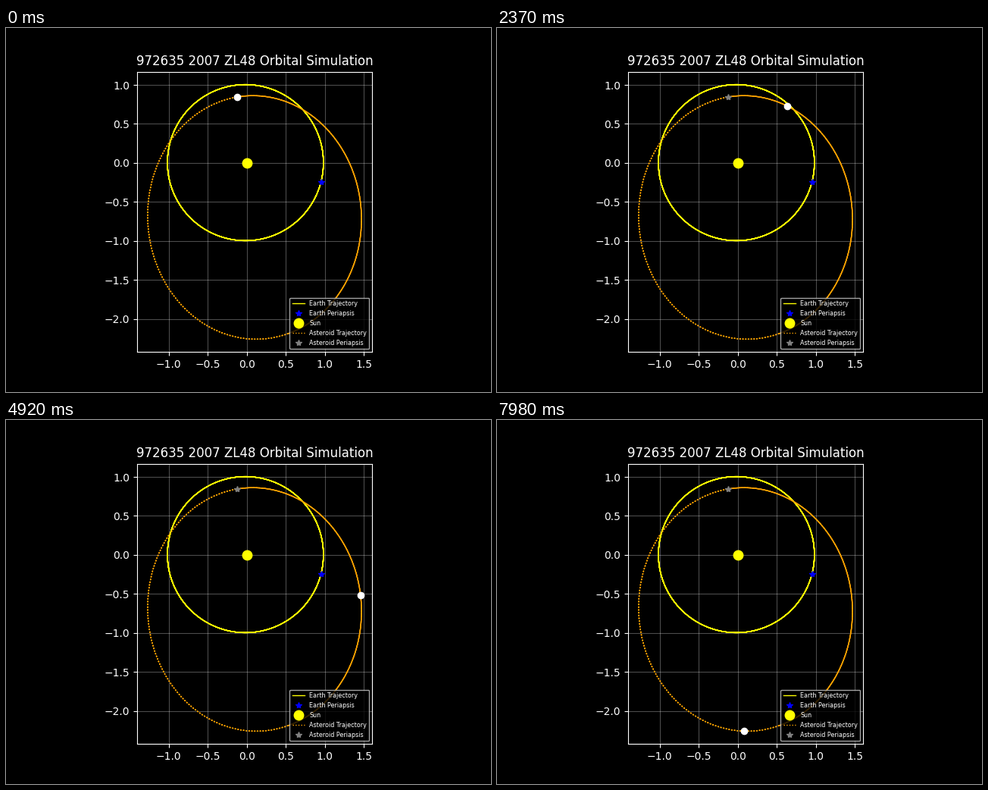
Recreate the animation shown at these times as a matplotlib script. Size 640 by 480 pixels, loop 8 s.

```python
import numpy as np
import matplotlib.pyplot as plt
from matplotlib.animation import FuncAnimation

FRAMES = 267
LOOP_MS = 8000
STEP_MS = 30
PERIOD_MS = 2254

# Asteroid ellipse seen from above: conjugate half axes, Sun at the origin
ECC = 0.4525
MAJOR = np.array([-0.2233, 1.5428])
MINOR = np.array([1.3524, 0.2303])

EARTH_ECC = 0.0167
EARTH_ANGLE = np.radians(-14.4)


def asteroid(E):
    """Position for eccentric anomaly E."""
    E = np.asarray(E)[..., None]
    return MAJOR * (np.cos(E) - ECC) + MINOR * np.sin(E)


def earth(E):
    x = np.cos(E) - EARTH_ECC
    y = np.sqrt(1 - EARTH_ECC**2) * np.sin(E)
    c, s = np.cos(EARTH_ANGLE), np.sin(EARTH_ANGLE)
    return c * x - s * y, s * x + c * y


def solve_kepler(M):
    E = M + ECC * np.sin(M)
    for _ in range(8):
        E -= (E - ECC * np.sin(E) - M) / (1 - ECC * np.cos(E))
    return E


def dotted(end, offsets):
    """Dotted laps laid over each other, each with its own dash phase."""
    path = asteroid(np.linspace(0, end, 700))
    for offset in offsets:
        ax.plot(*path.T, color="orange", lw=1, ls=(offset, (1, 1.65)))


plt.style.use("dark_background")
fig, ax = plt.subplots(figsize=(6.4, 4.8), dpi=100)
ax.set_xlim(-1.4068, 1.6088)
ax.set_ylim(-2.4215, 1.1692)
ax.set_aspect("equal")
ax.set_xticks(np.arange(-1, 1.6, 0.5))
ax.set_yticks(np.arange(-2, 1.1, 0.5))
ax.grid(alpha=0.3)
ax.set_title("972635 2007 ZL48 Orbital Simulation")

# Several laps on top of each other give the crisp Earth ring
ax.plot(*earth(np.linspace(0, 8 * np.pi, 1461)), color="yellow", lw=1,
        label="Earth Trajectory")
ax.plot(*earth(0.0), "*", color="blue", ls="none", label="Earth Periapsis")
ax.plot(0, 0, "o", color="yellow", ms=9, ls="none", label="Sun")

ax.plot([], [], ":", color="orange", lw=1, label="Asteroid Trajectory")
dotted(2 * np.pi, [0, 0.2, 0.4, 0.6])
# The last, unfinished lap fills the gaps between the dots
dotted(0.95 * np.pi, [1.1, 1.4, 1.7, 2.0])
ax.plot(*asteroid(0.0), "*", color="gray", ls="none",
        label="Asteroid Periapsis")

body, = ax.plot([], [], "o", color="white")
ax.legend(loc="lower right", fontsize="xx-small")


def update(i):
    M = 2 * np.pi * i * STEP_MS / PERIOD_MS
    x, y = asteroid(solve_kepler(M))
    body.set_data([x], [y])
    return body,


anim = FuncAnimation(fig, update, frames=FRAMES, interval=LOOP_MS / FRAMES,
                     init_func=lambda: update(0), blit=True, repeat=True,
                     repeat_delay=0)
plt.show()
```
